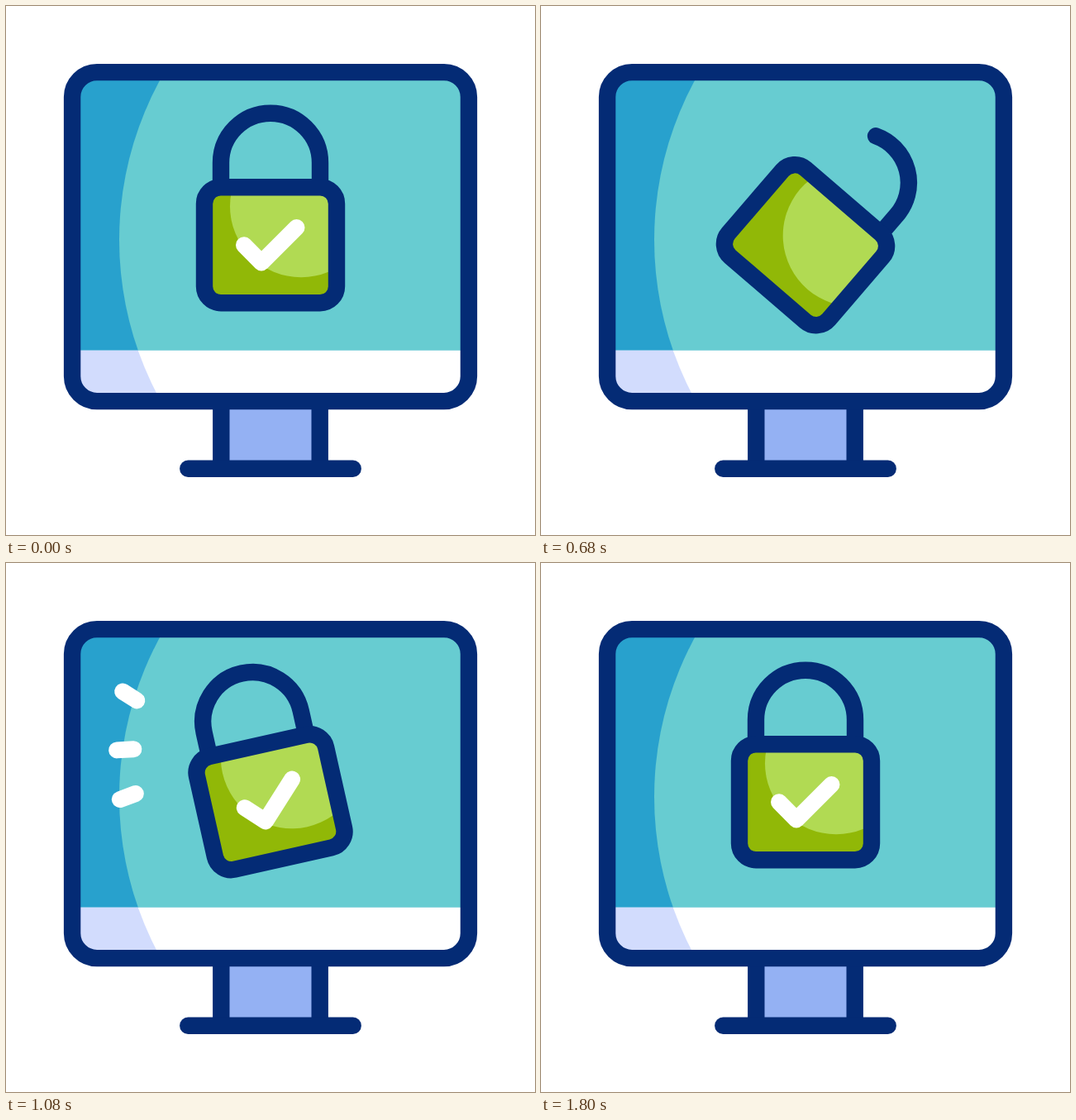
Animation of 640 by 640 pixels, one loop 2 s. Source, as an HTML page:

```html
<!DOCTYPE html>
<html lang="en">
<head>
<meta charset="utf-8">
<title>Lock on a screen</title>
<style>
  html, body { margin: 0; width: 100%; height: 100%; overflow: hidden; background: #fff; }
  svg { display: block; width: 100vw; height: 100vh; }
  .line { fill: none; stroke: #042b75; stroke-width: 20.4; }
  .white { fill: none; stroke: #fff; stroke-width: 20; }
  .round { stroke-linecap: round; stroke-linejoin: round; }
</style>
</head>
<body>
<svg viewBox="0 0 640 640">
  <defs>
    <clipPath id="screen"><rect x="80" y="80" width="480" height="398" rx="30"/></clipPath>
    <clipPath id="glow"><circle cx="541" cy="283" r="404"/></clipPath>
    <clipPath id="body"><rect x="-80" y="-70" width="160" height="140" rx="20"/></clipPath>
  </defs>

  <g clip-path="url(#screen)">
    <path fill="#28a1cd" d="M80 80H560V416.7H80z"/>
    <path fill="#d2dcfd" d="M80 416.7H560V478H80z"/>
    <g clip-path="url(#glow)">
      <path fill="#67ccd1" d="M80 80H560V416.7H80z"/>
      <path fill="#fff" d="M80 416.7H560V478H80z"/>
    </g>
  </g>
  <path fill="#94b1f3" d="M260 478H380V560H260z"/>
  <path class="line" d="M260.3 478V560M379.7 478V560"/>
  <path class="line round" d="M220.3 559.8H419.7"/>
  <rect class="line" x="80.1" y="80.1" width="479.8" height="398" rx="30"/>

  <g id="lock">
    <path id="shackle" class="line round"/>
    <g clip-path="url(#body)">
      <path fill="#91b807" d="M-80-70H80V70H-80z"/>
      <circle cx="37" cy="-47" r="86" fill="#b1da53"/>
    </g>
    <rect class="line" x="-80" y="-70" width="160" height="140" rx="20"/>
    <path id="check" class="white round" d="M-32 0L-11 21.3L31.5 -21.2" pathLength="1"/>
    <g id="sparks"></g>
  </g>
</svg>
<script>
  const LOOP = 2000, STEP = 40;
  const $ = id => document.getElementById(id);

  const clamp = x => Math.min(1, Math.max(0, x));
  const ramp = (t, from, to) => clamp((t - from) / (to - from));
  const linear = u => u;
  const smooth = u => u * u * (3 - 2 * u);
  const easeOut = u => u * (2 - u);

  // The lock tips open, slams shut past upright, rebounds and settles
  function angle(t) {
    const swing = (from, to, by, ease) => by * ease(ramp(t, from, to));
    return swing(80, 680, 40.7, smooth)
      + swing(680, 928, -76.7, smooth)
      + swing(928, 1000, 40, smooth)
      + swing(1000, 1140, -20.4, easeOut)
      + swing(1140, 1800, 16.4, linear);
  }

  // Trims: 0 is absent or closed, 1 is complete or fully open
  const opened = t => Math.min(ramp(t, 0, 604), ramp(t, 898, 633));
  const ticked = t => Math.max(ramp(t, 545, 0), ramp(t, 815, 1070));
  const sparkHead = t => ramp(t, 860, 920);
  const sparkTail = t => ramp(t, 1000, 1160) ** 2;

  // Half of the shackle's length is cut away at full opening
  function shacklePath(open) {
    const r = 60, cy = -99.5, leg = 30;
    const cut = open * (leg + Math.PI * r / 2);
    const a = Math.PI - Math.max(0, cut - leg) / r;
    const drop = Math.max(0, leg - cut);
    const x = r * Math.cos(a), y = cy - r * Math.sin(a);
    return `M${x} ${y + drop}V${y}A${r} ${r} 0 0 1 ${r} ${cy}v${leg}`;
  }

  function trim(el, from, to) {
    el.style.visibility = to > from ? "visible" : "hidden";
    el.setAttribute("stroke-dasharray", `0 ${from} ${to - from} 2`);
  }

  // Outer end and tilt of each spark, in the lock's own space
  const sparks = [[-145.2, -169.6, 45], [-167.6, -102, 9.5], [-177, -43, -7.6]].map(([x, y, tilt]) => {
    const el = document.createElementNS("http://www.w3.org/2000/svg", "path");
    el.setAttribute("class", "white round");
    el.setAttribute("d", "M27 0H0");
    el.setAttribute("pathLength", 1);
    el.setAttribute("transform", `translate(${x} ${y}) rotate(${tilt})`);
    $("sparks").append(el);
    return el;
  });

  function render(t) {
    $("lock").setAttribute("transform", `translate(320 289.2) rotate(${angle(t)})`);
    $("shackle").setAttribute("d", shacklePath(opened(t)));
    trim($("check"), 0, ticked(t));
    for (const el of sparks) trim(el, sparkTail(t), sparkHead(t));
  }

  // A leading zero dash would paint a stray round cap, so dashes start by offset
  trim = (el, from, to) => {
    el.style.visibility = to > from ? "visible" : "hidden";
    el.setAttribute("stroke-dasharray", `${to - from} 3`);
    el.setAttribute("stroke-dashoffset", -from);
  };

  const begin = performance.now();
  function tick() {
    const t = (performance.now() - begin) % LOOP;
    render(Math.floor(t / STEP) * STEP);
    requestAnimationFrame(tick);
  }
  tick();
</script>
</body>
</html>
```
